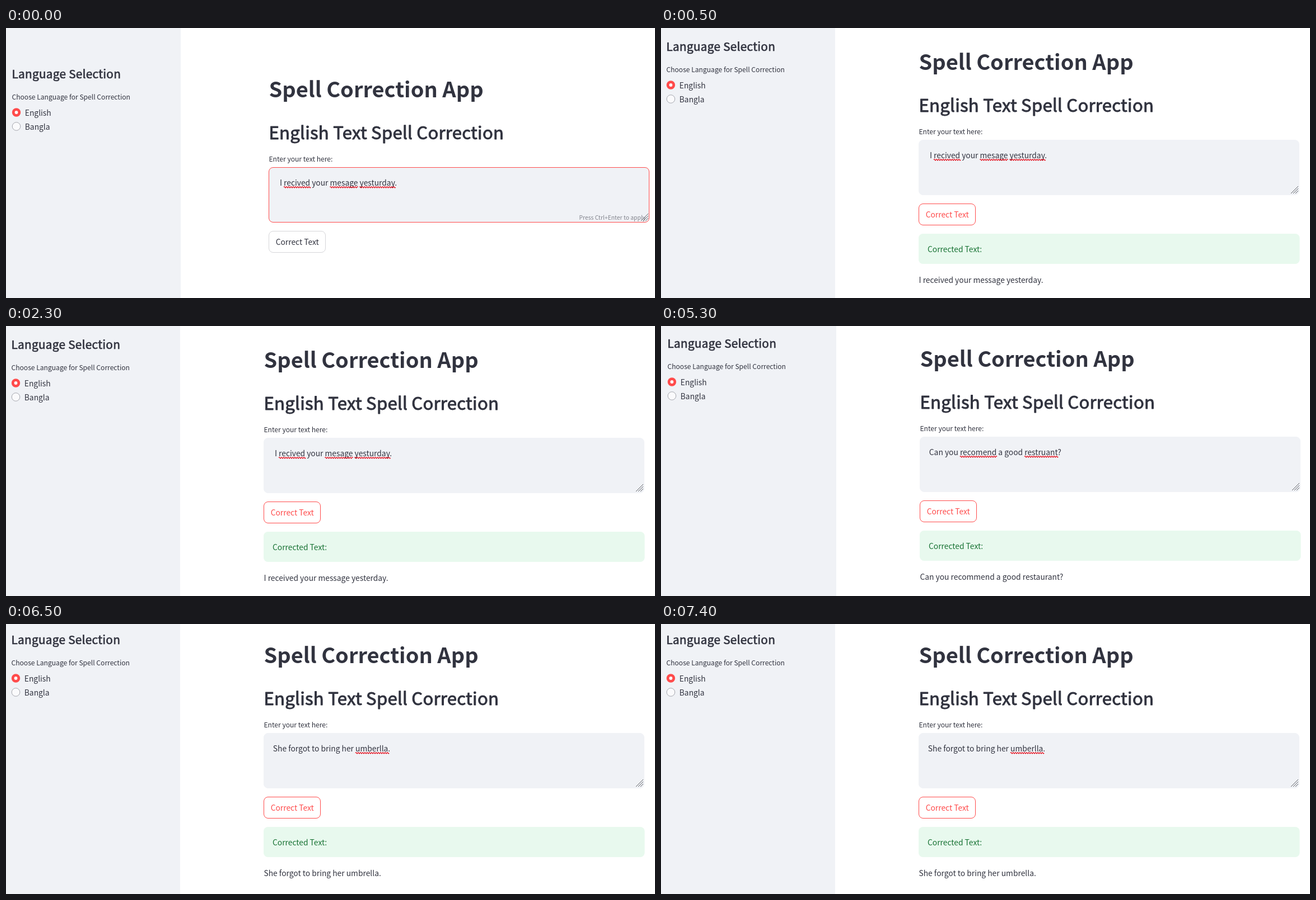
An HTML page for the animation above (8 s loop, 1159 by 483 pixels).

```html
<!DOCTYPE html>
<html lang="en">
<head>
<meta charset="utf-8">
<title>Spell Correction App</title>
<style>
  html, body { margin: 0; width: 100%; height: 100%; overflow: hidden; background: #fff; }
  svg { display: block; }
  text {
    font-family: "Noto Sans CJK SC", "Noto Sans CJK JP", "Noto Sans CJK KR", "Noto Sans CJK TC", "Noto Sans", sans-serif;
    font-size: 13.82px; fill: #31333f; white-space: pre;
  }
  .h1 { font-size: 38px; font-weight: 700; letter-spacing: -.02px; }
  /* semibold: the regular cut with a thin outline */
  .h2, .h3 { stroke: #31333f; stroke-width: .032em; stroke-linejoin: round; }
  .h2 { font-size: 31.1px; letter-spacing: .26px; }
  .h3 { font-size: 20.73px; letter-spacing: .3px; }
  .label { font-size: 12.09px; }
  .hint { font-size: 10.37px; fill: #83858e; }
</style>
</head>
<body>
<svg width="1159" height="483" viewBox="0 0 1159 483">
  <rect id="panel" height="483" fill="#f0f2f6"/>
  <g id="side">
    <text class="h3" x="10.5" y="89.7">Language Selection</text>
    <text class="label" x="10.5" y="127.5">Choose Language for Spell Correction</text>
    <circle cx="18.5" cy="151" r="7.7" fill="#ff4b4b"/>
    <circle cx="18.5" cy="151" r="2.9" fill="#fff"/>
    <text x="33.8" y="157">English</text>
    <circle cx="18.5" cy="176" r="7.3" fill="#fafafc" stroke="#a5a7ae"/>
    <text x="33.8" y="181.5">Bangla</text>
  </g>
  <g id="main">
    <text class="h1" x="0" y="124">Spell Correction App</text>
    <text class="h2" x="0" y="198.5">English Text Spell Correction</text>
    <text class="label" x="0" y="238.5">Enter your text here:</text>
    <rect id="box" x="0" y="249.5" width="679" height="98" rx="7.5" fill="#f0f2f6"/>
    <text id="input" x="16.3" y="281.7"></text>
    <path id="waves" fill="none" stroke="#e3000f" stroke-width="1.2"/>
    <text id="hint" class="hint" x="554" y="343">Press Ctrl+Enter to apply</text>
    <path d="M664.5 345l13-13m-9 13l9-9m-5 9l5-5" fill="none" stroke="#5d5f66"/>
    <rect id="button" x="0" y="363.5" width="101" height="38" rx="7.5" fill="#fff"/>
    <text id="action" x="12.2" y="388.3">Correct Text</text>
    <g id="result">
      <rect x="-.5" y="417" width="680.5" height="54" rx="7.7" fill="#e8f9ee"/>
      <text x="15.5" y="450.3" style="fill:#177233">Corrected Text:</text>
      <text id="output" x="0" y="505.3"></text>
    </g>
  </g>
</svg>
<script>
const $ = id => document.getElementById(id);
const set = (id, attrs) => {
  for (const k in attrs) $(id).setAttribute(k, attrs[k]);
};

const LOOP = 8000;
const RED = '#ff4b4b';
const first = ' I recived your mesage yesturday.';
const scenes = [
  { at: 0, x: 469.5, y: 0, side: 0, input: first, typos: ['recived', 'mesage', 'yesturday'] },
  { at: 500, x: 460.5, y: -49, side: -1, input: first, typos: ['recived', 'mesage', 'yesturday'],
    output: 'I received your message yesterday.' },
  { at: 3500, x: 462.5, y: -51, side: 1, input: 'Can you recomend a good restruant?',
    typos: ['recomend', 'restruant'], output: 'Can you recommend a good restaurant?' },
  { at: 6500, x: 460.5, y: -54, side: -1, input: 'She forgot to bring her umberlla.',
    typos: ['umberlla'], output: 'She forgot to bring her umbrella.' }
];

// Wavy underline below one misspelt word of the input
function wave(line, word) {
  const i = line.indexOf(word);
  const x = $('input').getStartPositionOfChar(i).x;
  const end = $('input').getEndPositionOfChar(i + word.length - 1).x;
  let d = `M${x} 284.7`;
  for (let n = 0; x + n * 2 < end; n++) d += `q1 ${n % 2 ? 2.4 : -2.4} 2 0`;
  return d;
}

function show(s) {
  const done = !!s.output;
  set('panel', { width: 312 + s.side });
  set('side', { transform: `translate(${s.side} ${s.y})` });
  set('main', { transform: `translate(${s.x} ${s.y})` });
  $('input').textContent = s.input;
  set('waves', { d: s.typos.map(w => wave(s.input, w)).join('') });
  set('box', { stroke: done ? '#f0f2f6' : RED });
  set('hint', { visibility: done ? 'hidden' : 'visible' });
  set('button', { stroke: done ? RED : '#d6d6d9' });
  $('action').style.fill = done ? RED : '#31333f';
  set('result', { visibility: done ? 'visible' : 'hidden' });
  $('output').textContent = s.output || '';
}

let current;
const start = performance.now();
function tick() {
  const t = (performance.now() - start) % LOOP;
  const scene = scenes.filter(s => s.at <= t).pop();
  if (scene !== current) show(current = scene);
  requestAnimationFrame(tick);
}
tick();
</script>
</body>
</html>
```
